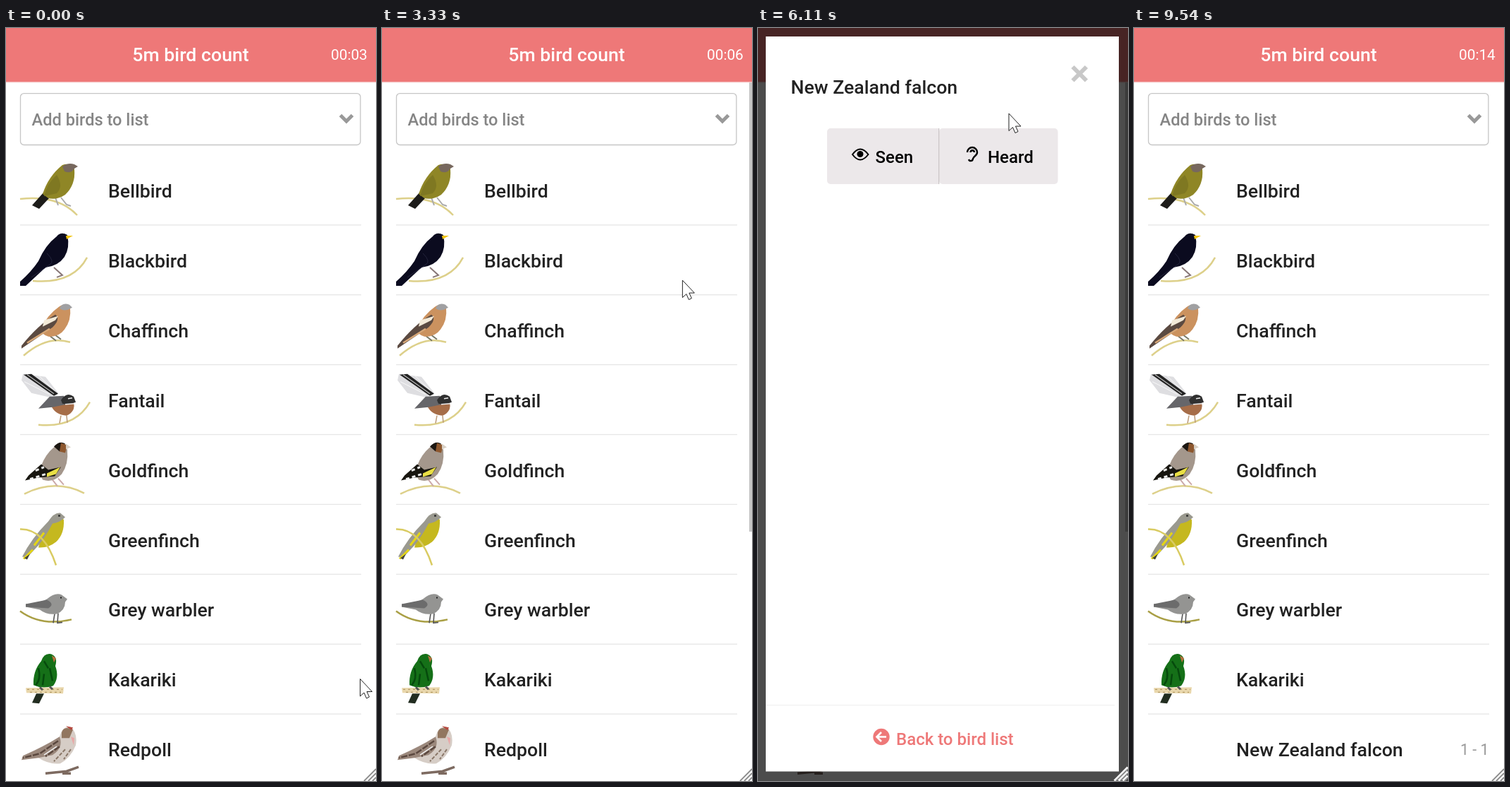
An HTML page for the animation above (9900 ms loop, 525 px wide and 1066 px high).

```html
<!DOCTYPE html>
<html lang="en">
<head>
<meta charset="utf-8">
<title>5m bird count</title>
<style>
  html, body { margin: 0; width: 525px; height: 1066px; overflow: hidden; background: #fff; }
  svg { display: block; font-family: Roboto, sans-serif; }
</style>
</head>
<body>
<svg id="stage" width="525" height="1066"></svg>
<script>
const LOOP = 9900, PINK = '#ee7878', TWIG = '#ddd08a', GREY = '#ece8ea', ROW = 98.9;

const text = (x, y, s, { size = 24, weight = 500, fill = '#222', anchor = 'start', id = '' } = {}) =>
  `<text x="${x}" y="${y}" font-size="${size}" font-weight="${weight}" fill="${fill}" text-anchor="${anchor}" id="${id}">${s}</text>`;
const rect = (x, y, w, h, fill, r = 0, extra = '') =>
  `<rect x="${x}" y="${y}" width="${w}" height="${h}" rx="${r}" fill="${fill}" ${extra}/>`;
// A width makes the path a stroke, otherwise it is filled.
const path = (color, d, width, dash = '') => width
  ? `<path d="${d}" fill="none" stroke="${color}" stroke-width="${width}" stroke-dasharray="${dash}"/>`
  : `<path d="${d}" fill="${color}"/>`;

// Bird shapes: [colour, path, stroke width, dash], y measured from the top of the row.
const birds = {
  'Bellbird': [
    [TWIG, 'M20 62Q74 56 101 85', 2.5],
    ['#aaa', 'M78 60L86 70L92 72M70 60L74 71', 2],
    ['#1d1c1a', 'M37 71L54 52L62 60L47 76Z'],
    ['#8f8626', 'M80 14Q92 10 97 20Q99 42 84 56Q72 64 60 61L52 55Q60 30 80 14Z'],
    ['#7f7822', 'M72 28Q82 44 72 54L54 58Q58 40 72 28Z'],
    ['#77685e', 'M80 16Q88 10 97 13L102 16L97 19Q92 27 83 23Z']],
  'Blackbird': [
    [TWIG, 'M38 79Q95 84 115 46', 2.5],
    ['#877', 'M68 60L80 71L72 74', 2],
    ['#0b0b1f', 'M72 16Q78 9 87 14Q91 32 83 45Q74 58 56 60L28 86H20V80Q36 66 46 51Q56 28 72 16Z'],
    ['#24243c', 'M58 40Q70 52 62 56L36 74', 1],
    ['#f1c40f', 'M85 15L95 15L86 20Z']],
  'Chaffinch': [
    [TWIG, 'M25 86Q58 57 91 67', 2.5],
    ['#776', 'M62 58L71 65M70 57L78 63', 2],
    ['#cb925f', 'M75 17Q88 9 91 18Q93 36 83 49Q75 60 60 59Q50 56 50 48Q58 29 75 17Z'],
    ['#a0a0a2', 'M76 19Q80 10 90 14L94 18L88 21Q80 23 76 19Z'],
    ['#5b4a41', 'M70 28Q78 34 66 46L22 76V72Q46 42 70 28Z'],
    ['#f3ead8', 'M54 36L74 30L70 36L52 45Z'],
    ['#d8a878', 'M62 48L30 68', 2.5]],
  'Fantail': [
    [TWIG, 'M46 85Q98 90 119 53', 2.5],
    ['#dedee1', 'M62 46L36 40L22 22L24 13L56 17L74 40Z'],
    ['#f7f7f7', 'M62 42L26 24M70 38L46 15', 1],
    ['#222', 'M68 44L25 14L36 13L74 41Z'],
    ['#bbb', 'M68 41L30 14', 1.2],
    ['#b97', 'M78 72L76 83M86 72L87 82', 1.5],
    ['#a66d48', 'M64 58Q84 50 96 54Q99 66 86 72Q70 71 64 58Z'],
    ['#66666a', 'M62 45L82 44L86 56L66 60L46 62Z'],
    ['#303030', 'M78 50Q86 38 96 45L99 53Q90 57 80 55Z'],
    ['#eee', 'M88 48L94 47M84 56L97 55', 1.6]],
  'Goldfinch': [
    [TWIG, 'M26 84Q70 62 111 83', 2.5],
    ['#caa', 'M66 64L73 73M74 62L82 71', 2],
    ['#a4978c', 'M68 18Q84 10 87 22Q89 42 79 56Q67 69 52 64Q46 56 50 44Q56 28 68 18Z'],
    ['#1c1712', 'M68 17Q76 8 84 13L76 24Z'],
    ['#8d572e', 'M78 12L87 15L84 26L76 24Z'],
    ['#d8d0c5', 'M85 13L92 18L85 21Z'],
    ['#17150f', 'M32 58L50 42L60 50L78 46L69 59L46 61L27 65Z'],
    ['#eadf45', 'M58 55L77 46L71 56L58 60Z'],
    ['#eee', 'M34 63L56 56M42 51L54 46', 3, '5 4']],
  'Greenfinch': [
    ['#c5b81f', 'M66 20Q78 14 82 22Q83 42 71 53Q60 62 46 61Q50 38 66 20Z'],
    ['#9a998f', 'M60 24Q68 11 77 12L84 18Q76 26 66 27Q56 46 46 58L30 75L23 74Q36 48 60 24Z'],
    ['#e4d514', 'M38 64L25 77M54 40L40 58', 3],
    ['#454535', 'M34 70L30 78L26 76Z'],
    ['#333', 'M74 16L77 16', 2.5],
    ['#d9cb62', 'M20 35Q54 34 71 86', 2.5]],
  'Grey warbler': [
    ['#a99f45', 'M20 52Q50 74 93 64', 2.5],
    ['#555', 'M69 56L67 69M74 55L73 69L80 68', 1.6],
    ['#949492', 'M58 35Q70 25 79 29L87 35L84 39Q84 51 72 56Q58 58 48 50L28 46V42Q46 42 58 35Z'],
    ['#6c6c6c', 'M58 36Q70 42 60 48L28 46V42Z'],
    ['#222', 'M77 33L79 33', 2]],
  'Kakariki': [
    ['#222d20', 'M43 70L54 70L47 84L37 83Z'],
    ['#157018', 'M50 24Q54 12 64 14Q74 18 70 31Q76 47 67 59Q52 64 39 58Q38 38 50 24Z'],
    ['#064a0d', 'M46 34Q50 50 42 58M54 42L52 58M62 34L66 52M54 24L60 34', 2.5],
    ['#b87040', 'M65 16L71 20L68 26Z'],
    ['#e9d7ac', 'M28 62L82 61L81 70L29 69Z'],
    ['#a88c55', 'M30 64H80M34 68H78', 1, '3 4'],
    ['#555', 'M48 61L52 65M62 60L66 64', 3]],
  'Redpoll': [
    ['#7d6a60', 'M56 84L86 81L103 75M80 84L92 84', 3.5],
    ['#d6cdc6', 'M76 32Q80 17 91 18Q102 26 99 44Q92 62 77 70Q62 72 46 62L74 40Z'],
    ['#9b887c', 'M76 32Q82 48 66 58L46 62L22 65L24 59Q54 46 76 32Z'],
    ['#5b483f', 'M74 38L48 56L24 62M76 46L56 60', 2.5, '9 2'],
    ['#8a7768', 'M84 50L68 67M92 50L82 64', 2, '5 2'],
    ['#eee', 'M72 46L54 58', 1.5],
    ['#92765f', 'M79 26Q82 16 95 22L90 34L79 34Z'],
    ['#b5493f', 'M85 17L95 19L93 23Z'],
    ['#e9a7a7', 'M92 32L97 34L96 44Z']],
  'Rifleman': [
    ['#5d4a30', 'M48 60L70 76L90 85M70 76L84 74', 3],
    ['#ece6cc', 'M46 34Q58 16 74 20L82 31L92 34L82 37Q82 52 68 59Q50 62 36 52L44 44Z'],
    ['#a8ac38', 'M44 32Q56 14 76 21Q66 33 58 38L28 48Q30 38 44 32Z'],
    ['#36571f', 'M38 40L58 36L62 46L44 53L22 47Z'],
    ['#222', 'M72 30L92 34', 1.8],
    ['#cfc158', 'M46 52L60 56', 3]],
  'Starling': [
    [TWIG, 'M44 86Q82 61 119 83', 2.5],
    ['#a5894d', 'M78 62L84 73M86 58L90 71', 2],
    ['#1b2028', 'M76 22Q84 9 98 15Q104 28 96 44Q88 61 70 63L50 60L22 76L20 73Q46 38 76 22Z'],
    ['#2c4055', 'M74 26Q84 42 66 54L44 62Q54 38 74 26Z'],
    ['#85858a', 'M56 52L22 74', 4],
    ['#b4bcc4', 'M78 22L92 36M74 38L54 54M88 46L70 58', 1.4, '1.500 5'],
    ['#e5c72b', 'M98 17L110 18L98 22Z']],
  'Song thrush': [
    [TWIG, 'M20 84Q60 66 97 84', 2.5],
    ['#bb9c84', 'M64 64L62 73M70 62L77 73', 2],
    ['#efe5d3', 'M74 18Q82 9 87 16Q89 40 80 54Q69 66 54 62L48 56Z'],
    ['#8f7762', 'M70 20Q77 10 90 13L84 18Q71 28 66 46L22 76V72Q52 46 70 20Z'],
    ['#6b5240', 'M80 24L78 48M82 32L70 58M74 36L60 60', 1.8, '2 4'],
    ['#6b5240', 'M62 42L32 66', 1.5]],
  'South island robin': [
    ['#554', 'M56 83Q72 68 88 85M66 74L72 82', 3],
    ['#333', 'M60 58L72 75M66 54L82 68', 1.8],
    ['#77777a', 'M66 24Q74 11 85 16L91 22L86 26Q88 43 74 55L48 60L24 82L22 78Q34 42 66 24Z'],
    ['#e1dcd4', 'M78 34Q86 42 74 54L52 58Q68 50 78 34Z'],
    ['#48484a', 'M54 44L24 78M66 36L46 56', 2.5]],
  'Tomtit': [
    ['#655', 'M40 78L90 74', 3],
    ['#f1eccf', 'M52 32Q72 28 76 48Q70 66 52 64Z'],
    ['#111', 'M48 18Q58 10 72 16L77 22L70 32L58 34L50 58L28 74Q36 44 48 18Z']]
};

const row = (name, i, shapes) => `<g transform="translate(0 ${180 + ROW * i})">
  ${shapes.map(s => path(...s)).join('')}${text(145, 60, name, { size: 26.67 })}
  ${rect(20, 98.2, 484, 1.3, '#e6e6e6')}</g>`;
const rows = Object.entries(birds).map(([name, shapes], i) => row(name, i, shapes));

const field = (bottom, extra = '') =>
  rect(20.5, 92.6, 482.4, bottom - 92.6, '#fff', 5, `stroke="#c6c6c6" stroke-width="1.33" ${extra}`);
const prompt = text(36.5, 138, 'Add birds to list', { size: 23.6, fill: '#858585' });

const seenButton = (bg, fg) => rect(98, 142, 158, 79, bg, 5) + rect(200, 142, 56, 79, bg) +
  path(fg, 'M134 179Q145 164 156.500 179Q145 194 134 179Z', 2) +
  `<circle cx="145" cy="178.500" r="4.500" fill="${fg}"/>` + text(166.5, 190.5, 'Seen', { fill: fg });

const levels = [['Close', '5m'], ['Near', '20m'], ['Mid', '80m'], ['Far', '320m'], ['Distant', '']];
const level = ([name, range], i) => {
  const y = 297 + 102.7 * i;
  const counter = x => rect(x, y, 84, 79, GREY, 5) +
    `<g class="${i ? '' : 'count'}">${text(x + 42, y + 49, '0', { fill: '#000', anchor: 'middle' })}</g>`;
  return text(34.5, y + 50.5, name, { size: 26.67 }) +
    text(34.5, y + 96.5, range, { size: 21.33, weight: 400, fill: '#999' }) + counter(182) + counter(344);
};

const stage = document.getElementById('stage');
stage.innerHTML = `
<defs><radialGradient id="glow">
  <stop offset="0" stop-color="#f6f6f6" stop-opacity=".4"/>
  <stop offset=".7" stop-color="#ddd" stop-opacity=".6"/>
  <stop offset="1" stop-color="#ccc" stop-opacity=".6"/>
</radialGradient></defs>
${rect(0, 0, 525, 1066, '#fff')}
<g id="list">
  ${rows.slice(0, 8).join('')}
  <g id="rest">${rows.slice(8).join('')}</g>
  <g id="added">${row('New Zealand falcon', 8, [])}
    ${text(503.5, 1029, '1 - 1', { size: 21.33, weight: 400, fill: '#999', anchor: 'end' })}</g>
  ${field(165.5)}${prompt}${path('#999', 'M474.500 123.500L483 132L491.500 123.500', 5)}
</g>
<g id="menu"></g>
<g id="thumb">${rect(521, 77, 4, 636, '#c6c6c6')}</g>
${rect(0, 0, 525, 76, PINK)}${rect(0, 76, 525, 1.3, '#f6c4c4')}
${text(262, 46.5, '5m bird count', { size: 26.67, fill: '#fff', anchor: 'middle' })}
${text(512.8, 44.5, '', { size: 20.8, weight: 400, fill: '#fff', anchor: 'end', id: 'clock' })}
<g id="modal">
  ${rect(0, 0, 525, 1066, '#000', 0, 'fill-opacity=".7"')}
  ${rect(11, 12, 501, 1040.5, '#fff')}
  ${text(46.5, 93, 'New Zealand falcon', { size: 26.67 })}
  ${path('#c8c8c8', 'M446.500 55L466 74.500M466 55L446.500 74.500', 6)}
  ${seenButton(GREY, '#000')}<g id="seen">${seenButton(PINK, '#fff')}</g>
  ${rect(257, 142, 168.5, 79, GREY, 5)}${rect(256, 142, 1.3, 79, '#ccc6c8')}
  ${path('#000', 'M297 176a7 7 0 0 1 14 0c0 5-5 5-6 9c-.6 4-5 4-6 1M301.500 176a2.700 2.700 0 0 1 5.400 0', 2.4)}
  ${text(326, 190.5, 'Heard', { fill: '#000' })}
  <g id="form">
    ${text(181.5, 276, 'Minimum')}${text(343.5, 276, 'Maximum')}${levels.map(level).join('')}
    ${text(34.5, 835, 'Notes', { weight: 400, fill: '#333' })}
    ${rect(36, 849, 452, 95.5, '#fff', 4, 'stroke="#f0bdbd" stroke-width="2.7"')}
    ${path('#888', 'M477 942L485 934M481 942L485 938', 1.2)}
    ${rect(506, 12, 4.5, 947, '#c4c4c4')}
  </g>
  ${rect(11, 958, 495, 1.3, '#f1f1f1')}
  <circle cx="175" cy="1003.500" r="11.700" fill="${PINK}"/>
  ${path('#fff', 'M182 1003.500H169M175 997L168.500 1003.500L175 1010', 2.6)}
  ${text(196, 1015, 'Back to bird list', { fill: PINK })}
</g>
<circle id="tap" fill="url(#glow)"/>
<g id="arrow"><path d="M.5.5V25L6 20L9.500 28L13.500 26L10 18.500H17.500Z" fill="#fff" stroke="#222"/></g>
<g id="beam">${['#fff', '#222'].map((c, i) => path(c, 'M-6-12H-2L0-10L2-12H6M0-10V10M-6 12H-2L0 10L2 12H6', 5 - 2.5 * i)).join('')}</g>
${path('#fff', 'M506 1066L525 1047M512 1066L525 1053M518 1066L525 1059', 4)}
${path('#8a8a8a', 'M508 1066L525 1049M514 1066L525 1055M520 1066L525 1061', 1.8)}`;

const $ = id => document.getElementById(id);
const show = (id, on) => { $(id).style.display = on ? '' : 'none'; };
const move = (id, x, y) => $(id).setAttribute('transform', `translate(${x} ${y})`);
const clamp = x => Math.max(0, Math.min(1, x));
// Value of the last [time, value] pair already reached.
const step = (t, ...pairs) => pairs.reduce((v, p) => t >= p[0] ? p[1] : v, 0);

const route = [[3060, 502, 921], [3480, 395, 128], [3740, 395, 128], [3860, 441, 80], [5990, 441, 80],
  [6300, 188, 200], [6520, 188, 200], [6760, 250, 282], [6970, 225, 338], [7260, 225, 338], [7610, 262, 987],
  [8040, 262, 987], [8200, 266, 1014], [8640, 266, 1014], [8740, 270, 1007], [9170, 270, 1007], [9270, 372, 1075]];
const taps = [[3480, 3740], [6300, 6520], [7000, 7260], [8200, 8740]];
const ticks = [440, 1410, 2470, 3470, 4410, 5440, 6000, 6500, 7500, 8500, 9540];

function pointerAt(t) {
  const i = route.findIndex(k => k[0] > t);
  if (i < 1) return (i ? route[route.length - 1] : route[0]).slice(1);
  const [t0, x0, y0] = route[i - 1], [t1, x1, y1] = route[i];
  const u = (t - t0) / (t1 - t0), e = u * u * (3 - 2 * u);
  return [x0 + (x1 - x0) * e, y0 + (y1 - y0) * e];
}

// Birds offered after each typed letter; the menu has room for seven.
const matches = [
  ['North Island brown kiwi', 'Okarito brown kiwi', 'Southern brown kiwi', 'Little spotted kiwi',
    'Great spotted kiwi', 'California quail', 'Helmeted guineafowl', 'Brown quail'],
  ['Helmeted guineafowl', 'Fiordland crested penguin', 'New Zealand falcon', 'Fairy prion',
    'Fulmar prion', 'Fairy tern', 'Fernbird', 'Rifleman'],
  ['New Zealand falcon', 'Fairy prion', 'Fairy tern', 'New Zealand fantail'],
  ['New Zealand falcon'], ['New Zealand falcon'], ['New Zealand falcon']];

let menuKey = '';
function drawMenu(t) {
  const open = t >= 3600 && t < 5510;
  show('menu', open);
  if (!open) return;
  const typed = t < 4590 ? 0 : Math.min(5, 1 + Math.floor((t - 4590) / 100));
  const caret = t < 4210 || (typed && t < 5290), settled = t >= 4210;
  const key = [typed, caret, settled].join();
  if (key === menuKey) return;
  menuKey = key;
  const items = matches[typed], bottom = Math.min(681, 180 + 69.25 * items.length);
  $('menu').innerHTML = field(bottom, 'style="filter:drop-shadow(0 3px 5px #0003)"') +
    (settled ? '' : `<g opacity=".035">${rows.slice(0, 5).join('')}</g>`) +
    (typed ? text(36.5, 138, 'falco'.slice(0, typed), { size: 23.6, id: 'query' }) + rect(21.2, 172, 481, 69.3, PINK)
           : prompt + rect(495.5, 164, 5, 9.5, '#c4c4c4', 2.5)) +
    path('#999', 'M474.500 134L483 125.500L491.500 134', 5) +
    items.slice(0, 7).map((s, i) => text(38.5, 215.5 + 69.25 * i, s,
      { size: 23.75, weight: 400, fill: typed && !i ? '#fff' : '#333' })).join('');
  if (caret) {
    const x = 36.5 + (typed ? $('query').getComputedTextLength() : 0);
    $('menu').insertAdjacentHTML('beforeend', rect(x, 113.5, 1.4, 31, '#222'));
  }
}

function render(t) {
  move('list', 0, -step(t, [1410, 180], [1445, 430], [1480, 549], [2220, 420], [2260, 0]));
  move('thumb', 0, step(t, [1410, 116], [1445, 277], [1480, 353], [2220, 299], [2260, 20], [2470, 0]));
  show('thumb', t >= 1410 && t < 8700);
  show('rest', t < 8600);
  show('added', t >= 8600);
  $('clock').textContent = '00:' + String(3 + ticks.filter(k => t >= k).length).padStart(2, '0');
  drawMenu(t);

  show('modal', t >= 5510 && t < 8740);
  $('modal').setAttribute('opacity', t < 5580 ? 0.5 : 1 - clamp((t - 8640) / 100));
  show('seen', t >= 6400);
  show('form', t >= 6400);
  document.querySelectorAll('.count text').forEach(n => { n.textContent = t < 7120 ? 0 : 1; });

  const [x, y] = pointerAt(t), tap = taps.find(([a, b]) => t >= a && t < b);
  const visible = !tap && (t < 3860 || t >= 5990) && t < 9270;
  const beam = (t > 3400 && t < 3860) || (t > 6690 && t < 6830);
  show('arrow', visible && !beam);
  show('beam', visible && beam);
  move('arrow', x, y);
  move('beam', x, y);
  show('tap', tap);
  if (tap) {
    const attrs = { cx: x, cy: y, r: 16 + 27 * clamp((t - tap[0]) / 160), opacity: clamp((tap[1] - t) / 100) };
    for (const name in attrs) $('tap').setAttribute(name, attrs[name]);
  }
}

const start = performance.now();
(function frame() {
  render((performance.now() - start) % LOOP);
  requestAnimationFrame(frame);
})();
</script>
</body>
</html>
```
